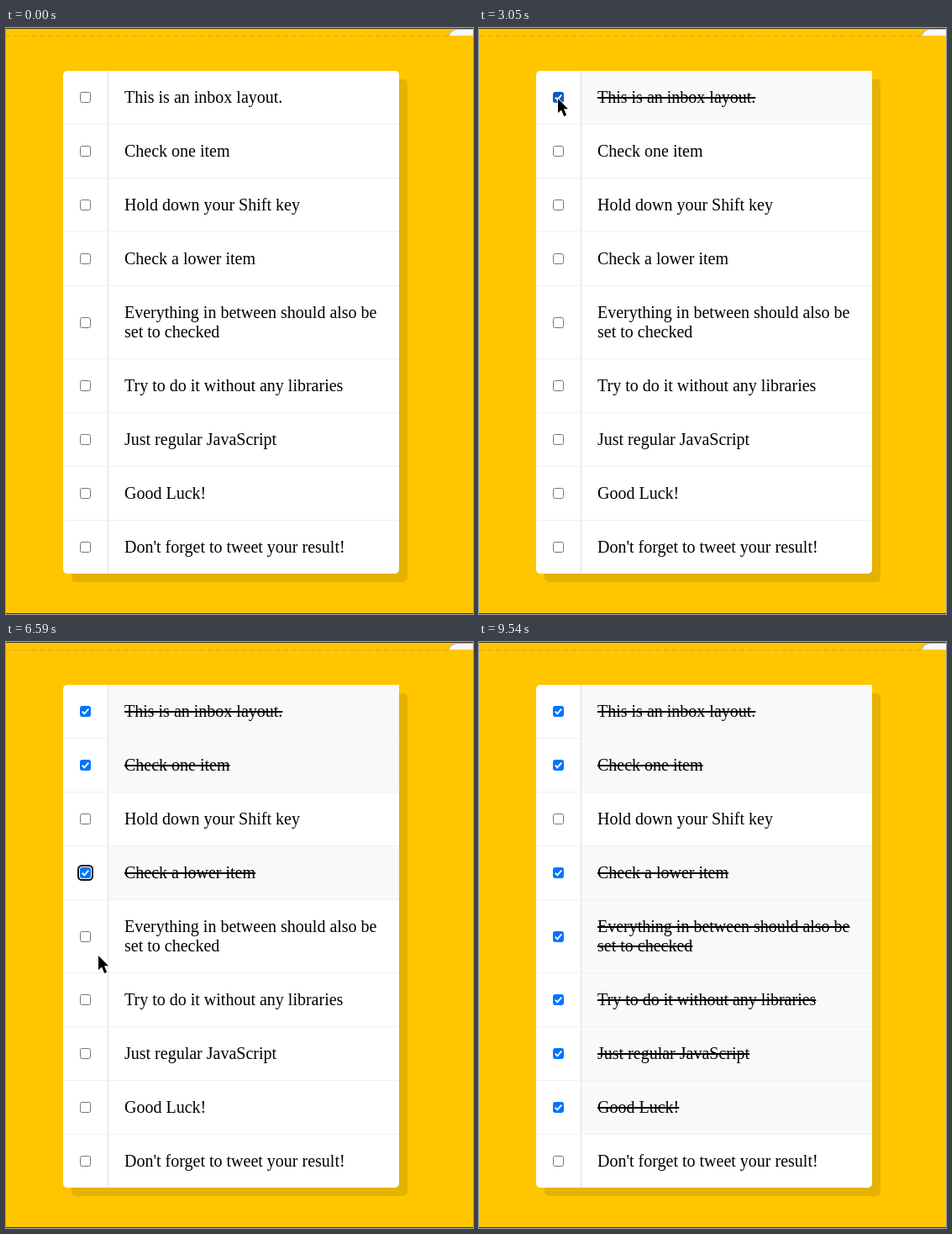
An HTML page that plays this animation: 556x697 px, repeating every 9.61 s.

```html
<!DOCTYPE html>
<html lang="en">
<head>
<meta charset="utf-8">
<title>Inbox checklist</title>
<style>
  html, body { margin: 0; width: 100%; height: 100%; overflow: hidden; background: #ffc600; }
  #stage { position: relative; width: 556px; height: 697px; overflow: hidden; background: #ffc600; }
  .edge { position: absolute; left: 0; width: 100%; height: 1px; background: #3b3426; }
  .dashes {
    position: absolute; left: 0; top: 9px; width: 528px; height: 1px;
    background: repeating-linear-gradient(90deg, #d8a63c 0 6px, transparent 6px 10px);
  }
  .corner {
    position: absolute; left: 527px; top: 1px; width: 40px; height: 8px; box-sizing: border-box;
    background: #f8f8fc; border: solid #b9b4a8; border-width: 1px 0 0 1px;
    border-radius: 12px 0 0 0 / 8px 0 0 0;
  }
  .inbox {
    position: absolute; left: 68px; top: 51px; width: 400px;
    background: #fff; border-radius: 5px; box-shadow: 10px 10px 0 rgba(0, 0, 0, .1);
  }
  .item { display: flex; align-items: center; border-bottom: 1px solid #f1f1f1; }
  .item:last-child { border-bottom: 0; }
  .item p {
    flex: 1; margin: 0; padding: 20px 20px 20px 19px; border-left: 1px solid #d6e0ee;
    font: 20px/23px "Liberation Serif", "Times New Roman", serif; color: #000;
  }
  .done p { text-decoration: line-through; }
  .box {
    box-sizing: border-box; width: 13px; height: 13px; margin: 20px;
    border: 1px solid #767676; border-radius: 2.5px; background: #fff;
  }
  .box svg { display: none; position: relative; left: -1px; top: -1px; }
  .hover .box { border-color: #4f4f4f; }
  .done .box { border-color: #0075ff; background: #0075ff; }
  .done.hover .box { border-color: #005cc8; background: #005cc8; }
  .done .box svg { display: block; }
  .ring .box { box-shadow: 0 0 0 1px #fff, 0 0 0 3px #101010; }
  #cursor, #press { position: absolute; left: 0; top: 0; overflow: visible; }
  #press {
    width: 24px; height: 24px; margin: -12px; border-radius: 50%;
    background: rgba(255, 255, 0, .5);
  }
</style>
</head>
<body>
<div id="stage">
  <div class="edge" style="top:0"></div>
  <div class="dashes"></div>
  <div class="corner"></div>
  <div class="inbox"></div>
  <div class="edge" style="bottom:0"></div>
  <svg id="cursor" width="13" height="22">
    <path d="M0 0V17L4 13.6L7.2 21L10.2 19.7L7 12.3H12Z" fill="#000" stroke="#fff" stroke-width="1.6" paint-order="stroke"/>
  </svg>
  <div id="press"></div>
</div>
<script>
  const LOOP = 9610, STEP = 65, FADE = 200;
  const ENTER = 810, LEAVE = 9140, BLUR = 9540;
  const LABELS = [
    "This is an inbox layout.",
    "Check one item",
    "Hold down your Shift key",
    "Check a lower item",
    "Everything in between should also be set to checked",
    "Try to do it without any libraries",
    "Just regular JavaScript",
    "Good Luck!",
    "Don't forget to tweet your result!"
  ];
  // Each click: travel to the row (perhaps stopping short below it, then settling), press, release.
  const CLICKS = [
    { row: 0, x: 94, travel: [ENTER, 1330], miss: 21, settle: [1515, 2090], down: 2590, hold: 60 },
    { row: 1, x: 94, travel: [2935, 3780], down: 4030, hold: 50 },
    { row: 3, x: 91, travel: [4225, 4670], miss: 19, settle: [4785, 5240], down: 5740, hold: 70, ring: 6130 },
    { row: 7, x: 93, travel: [6060, 7370], sway: 36, down: 7870, hold: 120, ring: 7870, shift: true }
  ];

  const CHECK = '<svg width="13" height="13"><path d="M2.7 6.7L5.3 9.3L10.3 3.6" fill="none" stroke="#fff" stroke-width="1.9"/></svg>';
  const inbox = document.querySelector(".inbox");
  const cursor = document.getElementById("cursor");
  const press = document.getElementById("press");

  const rows = LABELS.map(text => {
    const el = document.createElement("div");
    el.className = "item";
    el.innerHTML = `<div class="box">${CHECK}</div><p></p>`;
    const label = el.querySelector("p");
    label.textContent = text;
    inbox.append(el);
    return { el, label, checkedAt: Infinity, ring: [0, 0] };
  });
  for (const row of rows) {
    row.mid = inbox.offsetTop + row.el.offsetTop + (row.el.offsetHeight - 1) / 2;
  }

  const within = (t, a, b) => t >= a && t < b;
  const smooth = p => p * p * (3 - 2 * p);

  const path = [];
  const go = ([from, to], x, y, sway = 0) => path.push({ from, to, x, y, sway });

  CLICKS.forEach((c, i) => {
    const { mid } = rows[c.row];
    go(c.travel, c.x, mid + (c.miss || 0), c.sway);
    if (c.settle) go(c.settle, c.x, mid);

    // A shift click also checks the rows since the previous click.
    const first = c.shift ? CLICKS[i - 1].row + 1 : c.row;
    for (let r = first; r <= c.row; r++) rows[r].checkedAt = c.down + c.hold;

    const next = CLICKS[i + 1];
    if (c.ring) rows[c.row].ring = [c.ring, next ? next.down : BLUR];
  });
  go([8190, 8640], 93, 614);
  go([8955, LEAVE], 11, 411);

  // The pointer is sampled once per STEP.
  function cursorAt(t) {
    let x = 8, y = 402;
    for (const m of path) {
      if (t < m.from) break;
      const n = Math.round((m.to - m.from) / STEP);
      const k = t >= m.to ? n : Math.floor((t - m.from) / (m.to - m.from) * n);
      const p = smooth(k / n);
      x += (m.x - x) * p + m.sway * Math.sin(2 * Math.PI * p) * (1 - p);
      y += (m.y - y) * p;
    }
    return [Math.round(x), Math.round(y)];
  }

  function draw(t) {
    const [x, y] = cursorAt(t);
    const shown = within(t, ENTER, LEAVE);
    const pressed = CLICKS.some(c => within(t, c.down, c.down + c.hold));
    cursor.style.transform = press.style.transform = `translate(${x}px, ${y}px)`;
    cursor.style.display = shown ? "block" : "none";
    press.style.display = pressed ? "block" : "none";

    for (const { el, label, mid, checkedAt, ring } of rows) {
      const hover = shown && within(x, 88, 101) && Math.abs(y - mid) <= 7;
      const fade = Math.min(1, Math.max(0, (t - checkedAt) / FADE));
      el.classList.toggle("done", t >= checkedAt);
      el.classList.toggle("hover", hover);
      el.classList.toggle("ring", within(t, ...ring));
      label.style.backgroundColor = `rgba(249, 249, 249, ${smooth(fade)})`;
    }
  }

  const begin = performance.now();
  function tick() {
    draw((performance.now() - begin) % LOOP);
    requestAnimationFrame(tick);
  }
  tick();
</script>
</body>
</html>
```
